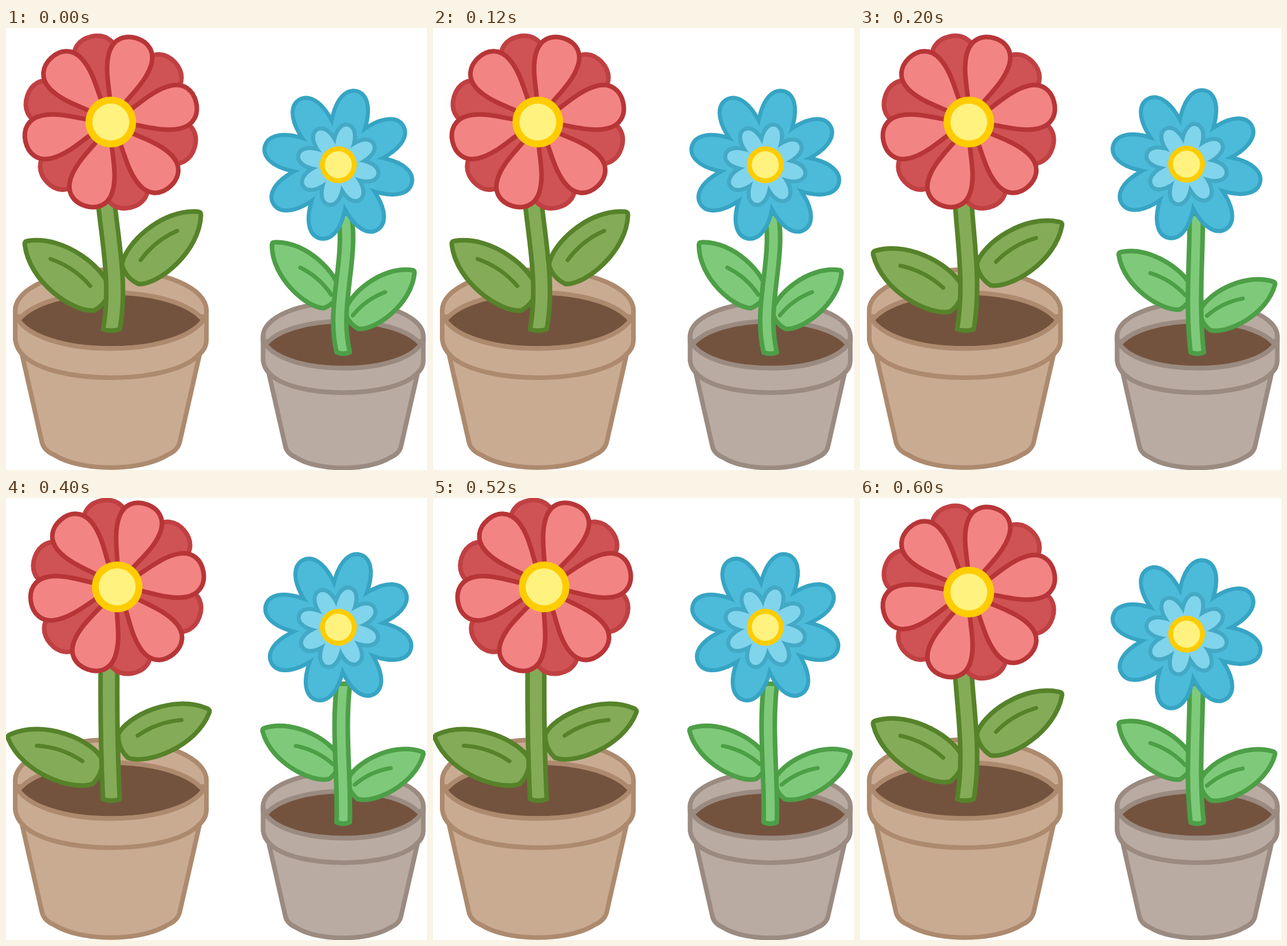
An HTML page for the animation above (0.8 s loop, 731 px wide and 766 px high).

```html
<!DOCTYPE html>
<html lang="en">
<head>
<meta charset="utf-8">
<title>Dancing flowers</title>
<style>
html, body { margin: 0; width: 100%; height: 100%; overflow: hidden; background: #fff; }
svg { display: block; width: 731px; height: 766px; stroke-width: 8; stroke-linejoin: round; stroke-linecap: round; }
path { vector-effect: non-scaling-stroke; }
.vein { fill: none; stroke-width: 7; }
</style>
</head>
<body>
<svg id="stage" viewBox="0 0 731 766"></svg>
<script>
const stage = document.getElementById('stage');

const path = (d, attrs = '') => `<path d="${d}" ${attrs}/>`;
const disc = (r, fill) => `<circle r="${r}" fill="${fill}"/>`;
const group = (attrs, ...parts) => `<g ${attrs}>${parts.join('')}</g>`;

// Petal from the origin along x: widest (half width w) at the belly, neck sets how fast it opens
function petal(length, w, belly, neck) {
  const cap = belly + .65 * (length - belly);
  return `M0 0C${belly / 3} ${-neck * w} ${belly * 2 / 3} ${-w} ${belly} ${-w}` +
    `C${cap} ${-w} ${length} ${-.57 * w} ${length} 0` +
    `C${length} ${.57 * w} ${cap} ${w} ${belly} ${w}` +
    `C${belly * 2 / 3} ${w} ${belly / 3} ${neck * w} 0 0Z`;
}

const ring = (n, start, d, attrs) => group(attrs,
  ...Array.from({ length: n }, (_, i) => path(d, `transform="rotate(${start + i * 360 / n})"`)));

// Petals that merge into one outlined silhouette
const merged = (d, fill, edge) =>
  ring(8, -76, d, `fill="${edge}" stroke="${edge}" stroke-width="14"`) + ring(8, -76, d, `fill="${fill}"`);

function redHead() {
  const d = petal(152, 38, 115, .2);
  return ring(6, -103, d, 'fill="#cf5355" stroke="#c04042"') +
    ring(6, -73, d, 'fill="#f38484" stroke="#b73537"') +
    disc(44, '#fc0') + disc(32, '#fff27f');
}

function blueHead() {
  const flower = s => petal(128 * s, 26.5 * s, 80 * s, .85);
  return merged(flower(1), '#4bbbd9', '#37a4c4') + merged(flower(.53), '#80d4ec', '#43a9c5') +
    disc(32, '#fc0') + disc(23.5, '#fff27f');
}

// Pot centred on x = 0, standing on the bottom of the stage
const pot = (x, size, fill, edge) => group(
  `fill="${fill}" stroke="${edge}" transform="translate(${x} 766) scale(${size}) translate(0 -766)"`,
  path('M-155 562L-120 716Q-117 732 -98 740C-52 769 52 769 98 740Q117 732 120 716L155 562Z'),
  path('M-166 500V489A166 70 0 0 1 166 489V500Z'),
  path('M-162 508C-112 442 112 442 162 508C128 571 -128 571 -162 508Z', 'fill="#74533e"'),
  path('M-166 489V540Q-164 556 -152 567C-102 619 102 619 152 567Q166 556 166 540V489V497C132 575 -132 575 -166 497Z'));

// Stem of half width w; xs steer its centre line from the top down to the foot
function stem(xs, foot, w) {
  const height = 240;
  const at = (i, side) => `${(i < 3 ? xs[i] : foot[0]) + side * w} ${foot[1] - height * (1 - i / 3)}`;
  return path(`M${at(0, -1)}C${at(1, -1)} ${at(2, -1)} ${at(3, -1)}q${w} 5 ${2 * w} 0` +
    `C${at(2, 1)} ${at(1, 1)} ${at(0, 1)}Z`);
}

// Leaf on the right (side 1) or left (side -1), rising at an angle and drooping about its joint
const leaf = ({ side, x, y, rise, size, droop }, vein, [dx, dy], pose) => group(
  `transform="translate(${x + dx} ${y + dy}) scale(${side} 1) rotate(${droop[pose]}) ` +
  `translate(0 10) rotate(${-rise}) scale(${size})"`,
  path('M164 -4C120 -50 30 -46 4 -22Q-6 0 4 22C30 46 120 50 164 4Q168 0 164 -4Z'),
  path(`M${vein} -7q41 -9 81 4`, 'class="vein"'));

// Lists hold one entry for each pose, from raised to drooping leaves
const turn = [0, 0, 3];
const plants = [{
  fill: '#84ac58', edge: '#56822a',
  pot: pot(182, 1, '#c9ab92', '#ad8a6e'),
  head: redHead(),
  headAt: [[182, 163], [189, 163], [193, 154]],
  foot: [183, 522], width: 14.5,
  stems: [[172, 179, 198], [178, 182, 197], [179, 178, 179]],
  shift: [[0, 0], [0, 0], [-10, 2]],
  vein: 34,
  leaves: [
    { side: -1, x: 170, y: 464, rise: 37, size: 1.03, droop: [0, 7, 15.5] },
    { side: 1, x: 213, y: 420, rise: 41.5, size: 1, droop: [0, 8, 19] }
  ]
}, {
  fill: '#7fca7a', edge: '#4d9f47',
  pot: pot(585.5, .838, '#b9aba2', '#9a8a80'),
  head: blueHead(),
  headAt: [[577, 237], [567, 236], [577, 224]],
  foot: [585.5, 562], width: 11.5,
  stems: [[588, 602, 566], [584, 584, 576], [586, 576, 588]],
  shift: [[0, 0], [0, 0], [3, -2]],
  vein: 12,
  leaves: [
    { side: -1, x: 568, y: 464, rise: 44, size: .88, droop: [0, 9, 15] },
    { side: 1, x: 598, y: 499, rise: 38.5, size: .85, droop: [0, 10, 11] }
  ]
}];

const drawPlant = (p, pose) => p.pot +
  group(`fill="${p.fill}" stroke="${p.edge}"`,
    ...p.leaves.map(l => leaf(l, p.vein, p.shift[pose], pose)),
    stem(p.stems[pose], p.foot, p.width)) +
  group(`transform="translate(${p.headAt[pose]}) rotate(${turn[pose]})"`, p.head);

const order = [0, 1, 2, 1];
const STEP = 200;
let shown = -1;

function tick(now) {
  const pose = order[Math.floor(now / STEP) % order.length];
  if (pose !== shown) {
    stage.innerHTML = plants.map(p => drawPlant(p, pose)).join('');
    shown = pose;
  }
  requestAnimationFrame(tick);
}
tick(performance.now());
</script>
</body>
</html>
```
